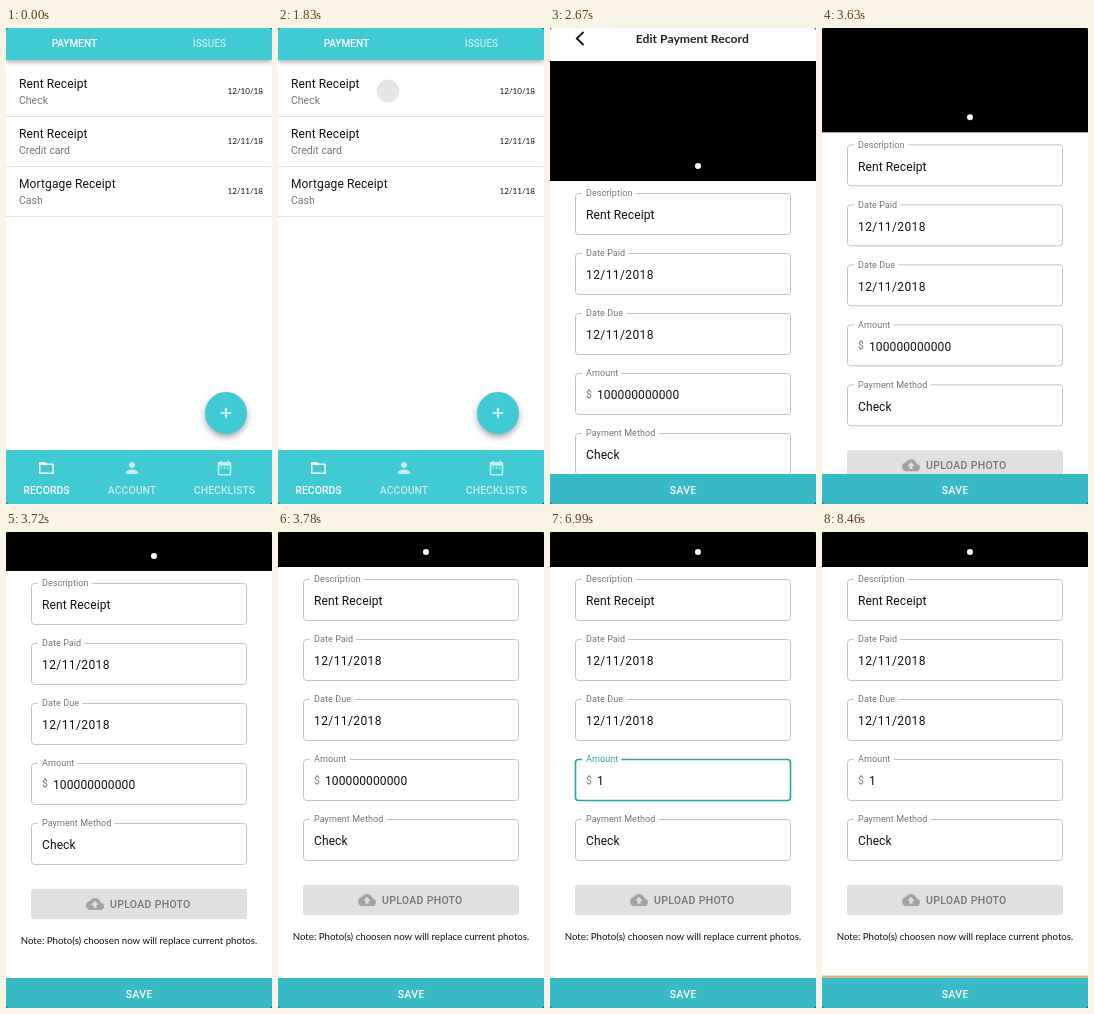
An HTML page with a canvas that plays this animation: 266x476 px, repeating every 9270 ms.

```html
<!DOCTYPE html>
<html lang="en">
<head>
<meta charset="utf-8">
<title>Payment records</title>
<style>
html, body { margin: 0; width: 100%; height: 100%; overflow: hidden; background: #fff; }
canvas { display: block; width: 266px; height: 476px; }
</style>
</head>
<body>
<canvas id="stage"></canvas>
<script>
const W = 266, H = 476, LOOP = 9270;
const TEAL = '#3fcad4', SAVE_TEAL = '#37bac4', FOCUS = '#2ba3a3';
const ROBOTO = 'Roboto, sans-serif', LATO = 'Lato, sans-serif';

// Moments of the story, in ms
const TAP = 1830, OPEN = 2130, PHOTO = 2520, SCROLL = 3540, FOCUS_ON = 4290, SAVE = 7770;
const SCROLL_MS = 205, SCROLL_MAX = 118;
const deletes = [0, 1, 2, 3, 4, 5, 6].map(i => 5580 + i * 115).concat(6450, 6540, 6720, 6930);

const icons = {
  folder: 'M20 6h-8l-2-2H4c-1.1 0-2 .9-2 2v12c0 1.1.9 2 2 2h16c1.1 0 2-.9 2-2V8c0-1.1-.9-2-2-2zm0 12H4V8h16v10z',
  person: 'M12 12c2.21 0 4-1.79 4-4s-1.79-4-4-4-4 1.79-4 4 1.79 4 4 4zm0 2c-2.67 0-8 1.34-8 4v2h16v-2c0-2.66-5.33-4-8-4z',
  dates: 'M9 11H7v2h2v-2zm4 0h-2v2h2v-2zm4 0h-2v2h2v-2zm2-7h-1V2h-2v2H8V2H6v2H5c-1.1 0-2 .9-2 2v14c0 1.1.9 2 2 2h14c1.1 0 2-.9 2-2V6c0-1.1-.9-2-2-2zm0 16H5V9h14v11z',
  cloud: 'M19.35 10.04C18.67 6.59 15.64 4 12 4 9.11 4 6.6 5.64 5.35 8.04 2.34 8.36 0 10.91 0 14c0 3.31 2.69 6 6 6h13c2.76 0 5-2.24 5-5 0-2.64-2.05-4.78-4.65-4.96zM14 13v4h-4v-4H7l5-5 5 5h-3z',
  plus: 'M19 13h-6v6h-2v-6H5v-2h6V5h2v6h6v2z'
};
for (const name in icons) icons[name] = new Path2D(icons[name]);

const canvas = document.getElementById('stage');
const ctx = canvas.getContext('2d');
const dpr = window.devicePixelRatio || 1;
canvas.width = W * dpr;
canvas.height = H * dpr;

const clamp = v => Math.max(0, Math.min(1, v));
const easeInOut = p => (1 - Math.cos(Math.PI * clamp(p))) / 2;
const easeOut = p => 1 - (1 - clamp(p)) ** 3;

function rect(x, y, w, h, color) {
  ctx.fillStyle = color;
  ctx.fillRect(x, y, w, h);
}

function circle(x, y, r, color) {
  ctx.fillStyle = color;
  ctx.beginPath();
  ctx.arc(x, y, r, 0, 7);
  ctx.fill();
}

function text(str, x, y, size, color, { font = ROBOTO, weight = 400, align = 'left', gap = 0 } = {}) {
  ctx.font = `${weight} ${size}px ${font}`;
  ctx.letterSpacing = gap + 'px';
  ctx.textAlign = align;
  ctx.fillStyle = color;
  ctx.fillText(str, x, y);
}

function icon(name, cx, cy, color, size = 18) {
  ctx.save();
  ctx.translate(cx - size / 2, cy - size / 2);
  ctx.scale(size / 24, size / 24);
  ctx.fillStyle = color;
  ctx.fill(icons[name]);
  ctx.restore();
}

function shadow(blur, dy, alpha, draw) {
  ctx.save();
  ctx.shadowColor = `rgba(0,0,0,${alpha})`;
  ctx.shadowBlur = blur * dpr;
  ctx.shadowOffsetY = dy * dpr;
  draw();
  ctx.restore();
}

function ripple(x, y, w, h, cx, cy, age, color, life) {
  if (age < 0 || age > life) return;
  ctx.save();
  ctx.beginPath();
  ctx.rect(x, y, w, h);
  ctx.clip();
  ctx.globalAlpha = clamp((life - age) / (life * 0.5));
  circle(cx, cy, 10 + 170 * easeOut(age / 350), color);
  ctx.restore();
}

function drawList(t) {
  const rows = [
    ['Rent Receipt', 'Check', '12/10/18'],
    ['Rent Receipt', 'Credit card', '12/11/18'],
    ['Mortgage Receipt', 'Cash', '12/11/18']
  ];
  shadow(5, 2, 0.35, () => rect(0, 0, W, 32, TEAL));
  const tab = { weight: 500, align: 'center' };
  text('PAYMENT', 68.5, 18.5, 10.1, '#fff', tab);
  text('ISSUES', 203.5, 18.5, 10.1, 'rgba(255,255,255,.7)', tab);

  ripple(0, 38, W, 50, 110, 63, t - TAP, 'rgba(0,0,0,.1)', 600);
  rows.forEach(([title, method, date], i) => {
    const y = 38 + i * 50;
    text(title, 13, y + 22, 12, '#111', { gap: 0.11 });
    text(method, 13, y + 37.5, 10.5, '#757575');
    text(date, 257, y + 28, 8.1, '#111', { font: LATO, align: 'right' });
    rect(0, y + 50, W, 1, '#e0e0e0');
  });

  shadow(6, 3, 0.35, () => circle(220, 385, 21, TEAL));
  icon('plus', 220, 385, '#fff');

  rect(0, 422, W, 54, TEAL);
  [['folder', 'RECORDS', 40.5], ['person', 'ACCOUNT', 126], ['dates', 'CHECKLISTS', 218.5]]
    .forEach(([name, label, x], i) => {
      const color = i ? 'rgba(255,255,255,.7)' : '#fff';
      icon(name, x, 440, color);
      text(label, x, 465.5, 10.5, color, { weight: 500, align: 'center' });
    });
}

function field(label, y, focused) {
  ctx.strokeStyle = focused ? FOCUS : '#c4c4c4';
  ctx.lineWidth = focused ? 1.6 : 1;
  ctx.beginPath();
  ctx.roundRect(25.5, y + 0.5, 215, 41, 3);
  ctx.stroke();
  ctx.font = `400 9px ${ROBOTO}`;
  ctx.letterSpacing = '0.08px';
  rect(32, y - 2, ctx.measureText(label).width + 7, 5, '#fff');
  text(label, 36, y + 3.2, 9, focused ? FOCUS : '#757575', { gap: 0.08 });
}

function caretOn(t) {
  if (t < FOCUS_ON || t >= SAVE) return false;
  if (t < 5580) return t < 4710 || t >= 5130;
  return t < 6990 || t >= 7380;
}

function drawForm(t) {
  const top = t < PHOTO ? 33 : 153;
  const y0 = top + 12;
  const focused = t >= FOCUS_ON && t < SAVE;
  const amount = '100000000000'.slice(0, 12 - deletes.filter(d => t >= d).length);
  const values = [
    ['Description', 'Rent Receipt'],
    ['Date Paid', '12/11/2018'],
    ['Date Due', '12/11/2018'],
    ['Amount', amount],
    ['Payment Method', 'Check']
  ];

  ctx.save();
  ctx.translate(0, -SCROLL_MAX * easeInOut((t - SCROLL) / SCROLL_MS));

  ctx.strokeStyle = '#111';
  ctx.lineWidth = 1.8;
  ctx.beginPath();
  ctx.moveTo(33.5, 4);
  ctx.lineTo(26.8, 10.5);
  ctx.lineTo(33.5, 17);
  ctx.stroke();
  text('Edit Payment Record', 142.3, 14.7, 12.2, '#222', { font: LATO, weight: 700, align: 'center' });

  if (t >= PHOTO) {
    rect(0, 33, W, 120, '#000');
    circle(148, 138, 3, '#fff');
  }

  values.forEach(([label, value], i) => {
    const y = y0 + i * 60, isAmount = label === 'Amount';
    field(label, y, isAmount && focused);
    if (isAmount) text('$', 36, y + 24.5, 10.5, '#757575');
    text(value, isAmount ? 47 : 36, y + 26.2, 12, '#111', { gap: value.includes('/') ? 0.4 : 0.11 });
    if (isAmount && caretOn(t)) rect(47.6 + amount.length * 6.85, y + 15, 1, 14, '#222');
  });

  const by = y0 + 306;
  ctx.fillStyle = '#e0e0e0';
  ctx.beginPath();
  ctx.roundRect(25, by, 216, 30, 3);
  ctx.fill();
  icon('cloud', 89, by + 15, '#a3a3a3');
  text('UPLOAD PHOTO', 104, by + 18.8, 10.5, '#757575', { weight: 500, gap: 0.3 });
  text('Note: Photo(s) choosen now will replace current photos.', 133, by + 55.2, 9.66, '#111',
    { font: LATO, align: 'center' });
  ctx.restore();

  rect(0, 446, W, 30, SAVE_TEAL);
  ripple(0, 446, W, 30, 134, 462, t - SAVE, 'rgba(255,255,255,.3)', 480);
  if (t >= SAVE) {
    rect(0, 443, W, 1, '#eed9b8');
    rect(0, 444, W, 2, '#d8b888');
  }
  text('SAVE', 133.2, 465.8, 10.5, '#fff', { weight: 500, align: 'center', gap: 0.3 });
}

function drawCorners() {
  ctx.fillStyle = '#444';
  ctx.beginPath();
  ctx.rect(0, 0, W, H);
  ctx.roundRect(0, 0, W, H, 3);
  ctx.fill('evenodd');
}

function frame(now) {
  const t = (now - start) % LOOP;
  ctx.setTransform(dpr, 0, 0, dpr, 0, 0);
  rect(0, 0, W, H, '#fff');
  (t < OPEN ? drawList : drawForm)(t);
  drawCorners();
  requestAnimationFrame(frame);
}

const start = performance.now();
requestAnimationFrame(now => frame(Math.max(now, start)));
</script>
</body>
</html>
```
